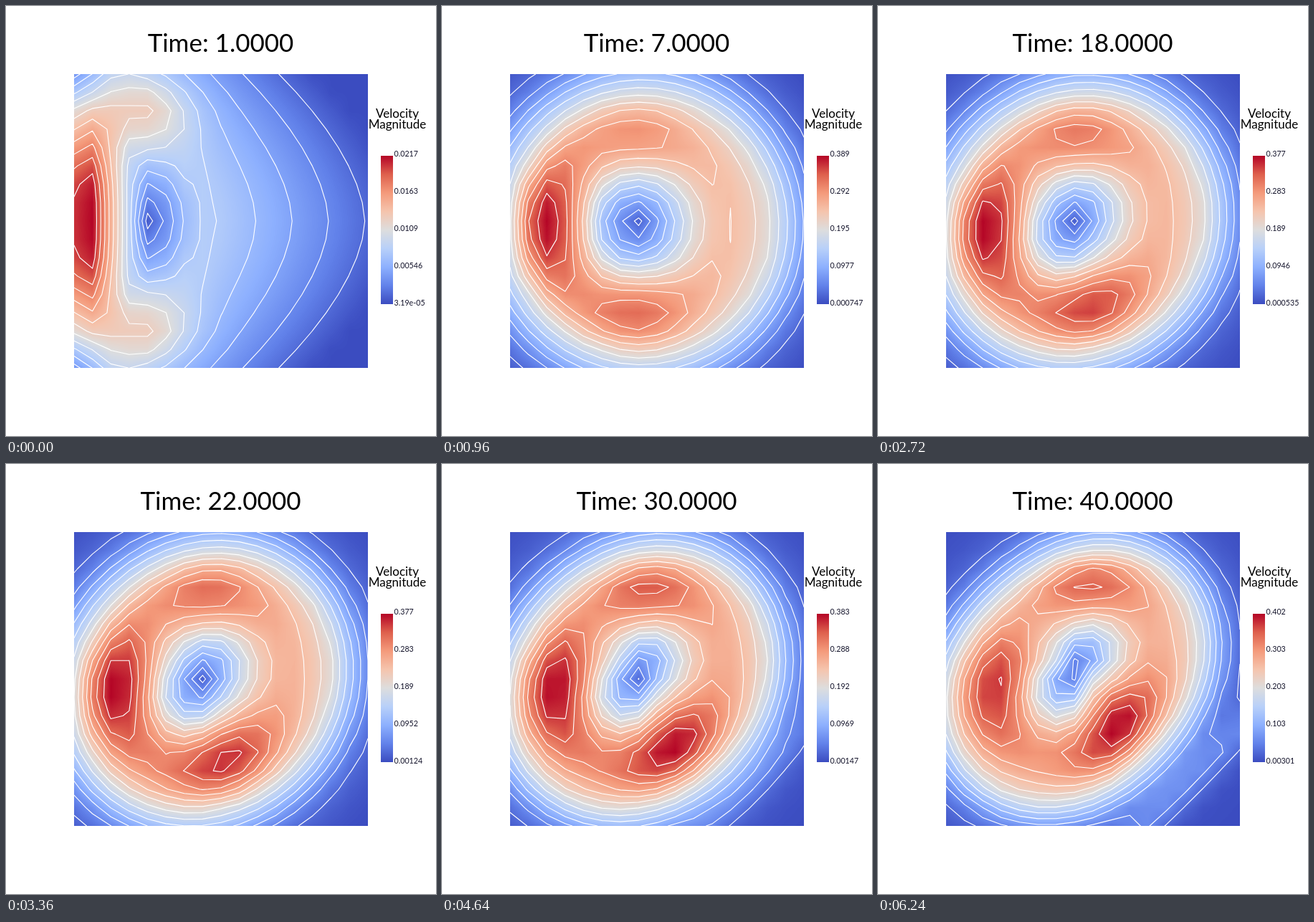
An HTML page with a canvas for the animation above (6400 ms loop, 600 by 600 pixels).

```html
<!DOCTYPE html>
<html lang="en">
<head>
<meta charset="utf-8">
<title>Velocity magnitude</title>
<style>
  html, body { margin: 0; width: 100%; height: 100%; overflow: hidden; background: #fff; }
  canvas { display: block; width: 600px; height: 600px; }
</style>
</head>
<body>
<canvas id="stage" width="600" height="600"></canvas>
<script>
const ctx = document.getElementById('stage').getContext('2d');
const STEP_MS = 160, STEPS = 40;
const LEFT = 95, TOP = 95, SIZE = 410, CELLS = 16, CELL = SIZE / CELLS;
const LEVELS = 14;
const INNER = 0.357, OUTER = 0.5, RIM = 0.214;
const RAD = Math.PI / 180;

// Cool-to-warm colour stops, evenly spaced.
const STOPS = ['#3b4cc0', '#6282ea', '#8db0fe', '#b8d0f9', '#dddddd', '#f5c4ad', '#f49a7b', '#de604d', '#b40426'];
const STOP_RGB = STOPS.map(hex => [1, 3, 5].map(i => parseInt(hex.slice(i, i + 2), 16)));

// Key points of the scalar range: [time, min, max]
const RANGES = [
  [1, 0.0000319, 0.02174], [7, 0.000747, 0.3886], [14, 0.00111, 0.37545],
  [18, 0.000535, 0.3768], [25, 0.00177, 0.3776], [34, 0.00123, 0.3879], [40, 0.00301, 0.4024]
];

const clamp = (v, lo, hi) => Math.min(hi, Math.max(lo, v));
const mix = (a, b, s) => a + (b - a) * s;
const mixAll = (a, b, s) => a.map((v, i) => mix(v, b[i], s));
const bell = d => Math.exp(-d * d);

function color(v) {
  const p = clamp(v, 0, 1) * (STOPS.length - 1);
  const i = Math.min(STOPS.length - 2, Math.floor(p));
  return mixAll(STOP_RGB[i], STOP_RGB[i + 1], p - i);
}

function rangeAt(time) {
  const next = Math.max(1, RANGES.findIndex(key => key[0] >= time));
  const a = RANGES[next - 1], b = RANGES[next];
  return mixAll(a, b, (time - a[0]) / (b[0] - a[0])).slice(1);
}

// Start-up flow: a jet on the left wall, mirrored above and below the middle.
function startField(x, y) {
  const v = Math.abs(y - 300), dx = x - 118;
  const u = x + 120 * (v / 205) ** 1.7;
  const base = clamp(0.357 - 0.071 * (u - 300) / 50, 0, 0.37);
  const jet = 0.64 * Math.exp(-((Math.abs(dx) / (dx < 0 ? 60 : 33)) ** 2.4) - (v / 135) ** 3);
  const lobe = 0.23 * bell((x - 187) / 68) * bell((v - 152) / 48);
  const corner = 0.22 * bell((x - 98) / 30) * bell((v - 205) / 30);
  const cone = 0.34 * Math.max(0, 1 - Math.hypot((x - 198) / (x < 198 ? 25 : 65), v / 98));
  return Math.max(0, base + jet + lobe - corner - cone);
}

// Speed along a ray: calm core, fast ridge, then decay towards the walls.
function profile(r, inner, ridge, peak, outer, rim) {
  if (r < inner) return mix(0.03, INNER, r / inner);
  if (r < ridge) return mix(INNER, peak, Math.sin(Math.PI / 2 * (r - inner) / (ridge - inner)));
  if (r < outer) return mix(peak, OUTER, ((r - ridge) / (outer - ridge)) ** 1.6);
  if (r < rim) return mix(OUTER, RIM, (r - outer) / (rim - outer));
  return RIM * Math.exp((rim - r) / (0.75 * (rim - outer)));
}

// Settled gyre: a round vortex that is slowly stretched along the rising diagonal.
function gyreField(time) {
  const s = clamp((time - 7) / 33, 0, 1);
  const cx = mix(271, 274, s), cy = mix(304, 287, s * s);
  const streak = 0.12 * clamp((time - 22) / 18, 0, 1);
  const lobe = (angle, center, width, height) => {
    const turn = Math.abs(angle - center * RAD) % (2 * Math.PI);
    return height * bell(Math.min(turn, 2 * Math.PI - turn) / width);
  };
  return (x, y) => {
    const dx = x - cx, dy = y - cy, angle = Math.atan2(dy, dx);
    const stretch = tilt => s * Math.cos(2 * (angle + tilt * RAD));
    const inner = mix(52, 38, s) + 18 * stretch(55);
    const ridge = mix(129, 116, s) + 16 * stretch(55);
    const outer = mix(183, 170, s) + 22 * stretch(45)
      + (1 - s) * 8 * Math.cos(angle - 20 * RAD) + s * 9 * Math.sin(angle);
    const peak = 0.65
      + lobe(angle, mix(180, 168, s), 0.75, mix(0.35, 0.29, s))
      + lobe(angle, mix(270, 280, s), 0.6, mix(0.12, 0.22, s))
      + lobe(angle, mix(90, 52, s), mix(0.6, 0.75, s), mix(0.2, 0.35, s));
    const along = (x + y - 563) / Math.SQRT2;
    return profile(Math.hypot(dx, dy), inner, ridge, peak, outer, outer + mix(45, 33, s))
      + streak * bell((along - 222) / 22);
  };
}

function makeGrid(time) {
  const gyre = gyreField(time);
  const settled = 1 - (1 - clamp((time - 1) / 6, 0, 1)) ** 2;
  const grid = [];
  for (let j = 0; j <= CELLS; j++) {
    for (let i = 0; i <= CELLS; i++) {
      const x = LEFT + i * CELL, y = TOP + j * CELL;
      grid.push(mix(startField(x, y), gyre(x, y), settled));
    }
  }
  const lo = Math.min(...grid), hi = Math.max(...grid);
  return grid.map(v => (v - lo) / (hi - lo));
}

const at = (grid, i, j) => grid[j * (CELLS + 1) + i];
const palette = Array.from({ length: 256 }, (_, i) => color(i / 255));
const image = ctx.createImageData(SIZE, SIZE);

function paintField(grid) {
  let p = 0;
  for (let y = 0; y < SIZE; y++) {
    const gy = (y + 0.5) / CELL, j = Math.floor(gy);
    for (let x = 0; x < SIZE; x++) {
      const gx = (x + 0.5) / CELL, i = Math.floor(gx);
      const upper = mix(at(grid, i, j), at(grid, i + 1, j), gx - i);
      const lower = mix(at(grid, i, j + 1), at(grid, i + 1, j + 1), gx - i);
      const [r, g, b] = palette[Math.round(mix(upper, lower, gy - j) * 255)];
      image.data[p++] = r;
      image.data[p++] = g;
      image.data[p++] = b;
      image.data[p++] = 255;
    }
  }
  ctx.putImageData(image, LEFT, TOP);
}

function paintContours(grid) {
  const corners = [[0, 0], [1, 0], [1, 1], [0, 1]];
  ctx.beginPath();
  for (let n = 1; n < LEVELS; n++) {
    const level = n / LEVELS;
    for (let j = 0; j < CELLS; j++) {
      for (let i = 0; i < CELLS; i++) {
        const hits = [];
        corners.forEach(([ax, ay], k) => {
          const [bx, by] = corners[(k + 1) % 4];
          const a = at(grid, i + ax, j + ay), b = at(grid, i + bx, j + by);
          if ((a < level) === (b < level)) return;
          const s = (level - a) / (b - a);
          hits.push([LEFT + (i + mix(ax, bx, s)) * CELL, TOP + (j + mix(ay, by, s)) * CELL]);
        });
        for (let h = 0; h < hits.length; h += 2) {
          ctx.moveTo(...hits[h]);
          ctx.lineTo(...hits[h + 1]);
        }
      }
    }
  }
  ctx.strokeStyle = '#fff';
  ctx.lineWidth = 1.1;
  ctx.lineCap = 'round';
  ctx.stroke();
}

function text(str, x, y, size, align = 'center', fill = '#000') {
  ctx.font = `${size}px Lato, sans-serif`;
  ctx.textAlign = align;
  ctx.fillStyle = fill;
  ctx.fillText(str, x, y);
}

function formatValue(v) {
  return v < 1e-4 ? v.toExponential(2).replace(/e-(\d)$/, 'e-0$1') : v.toPrecision(3);
}

function paintLegend(time) {
  text('Velocity', 546, 156, 17);
  text('Magnitude', 546, 171, 17);
  const bar = ctx.createLinearGradient(0, 416, 0, 209);
  STOPS.forEach((hex, i) => bar.addColorStop(i / (STOPS.length - 1), hex));
  ctx.fillStyle = bar;
  ctx.fillRect(523, 209, 17, 207);
  const [lo, hi] = rangeAt(time);
  for (let i = 0; i <= 4; i++) {
    text(formatValue(mix(hi, lo, i / 4)), 541.5, 210 + i * 52.1, 10.7, 'left', '#14142b');
  }
}

function draw(time) {
  ctx.fillStyle = '#fff';
  ctx.fillRect(0, 0, 600, 600);
  const grid = makeGrid(time);
  paintField(grid);
  paintContours(grid);
  text(`Time: ${time.toFixed(4)}`, 299.5, 64, 35);
  paintLegend(time);
}

const start = performance.now();
let shown = 0;

function tick() {
  const elapsed = Math.max(0, performance.now() - start);
  const time = Math.floor(elapsed / STEP_MS) % STEPS + 1;
  if (time !== shown) draw(shown = time);
  requestAnimationFrame(tick);
}
tick();
</script>
</body>
</html>
```
